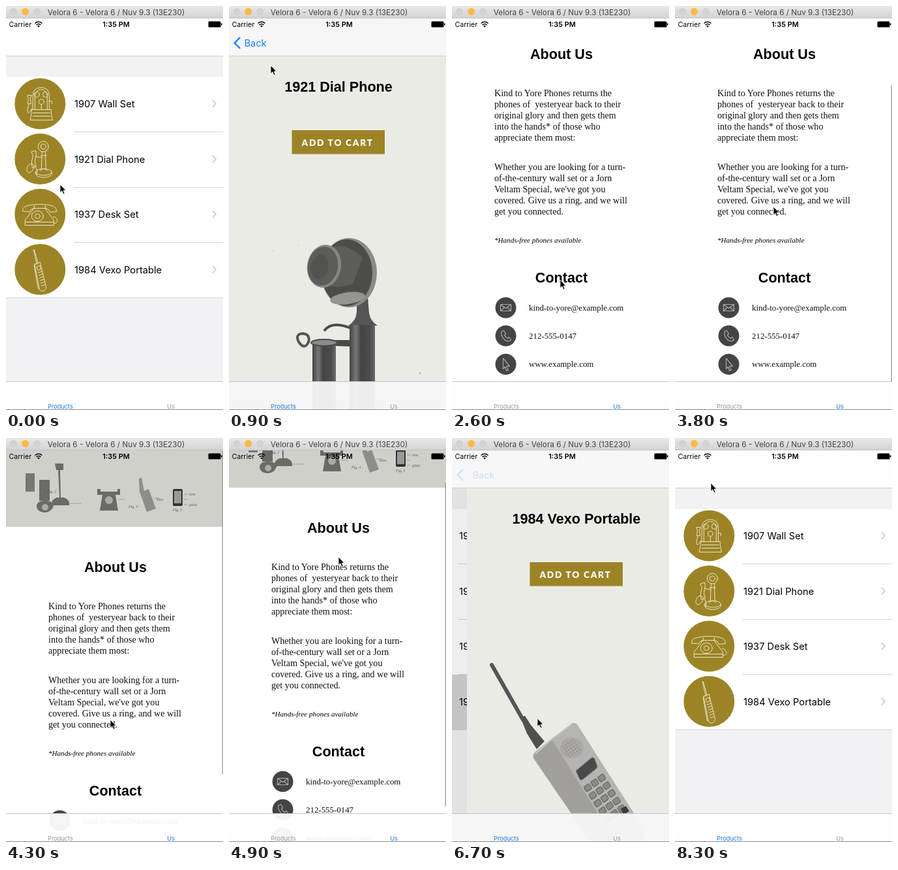
Recreate the animation shown at these times as an HTML page. Size 333x618 px, loop 8400 ms.

```html
<!DOCTYPE html>
<html lang="en">
<head>
<meta charset="utf-8">
<title>Phone shop</title>
<style>
html, body { margin: 0; width: 100%; height: 100%; overflow: hidden; background: #fff; }
svg { display: block; width: 100vw; height: 100vh; font-family: Inter, Roboto, sans-serif; }
.mid { text-anchor: middle; }
.head { font: bold 21.6px "Liberation Sans", Arial, sans-serif; text-anchor: middle; }
.body { font: 14.1px "Liberation Serif", serif; fill: #111; white-space: pre; }
.note { font: italic 11.1px "Liberation Serif", serif; }
.info { font: 12.9px "Liberation Serif", serif; fill: #111; }
.btn { font: 900 13.6px Lato, sans-serif; letter-spacing: 1.75px; fill: #fff; }
.row { font-size: 14.7px; }
.tab { font-size: 9.2px; text-anchor: middle; }
.line { fill: none; stroke: #eae3c6; stroke-width: 1; stroke-linejoin: round; stroke-linecap: round; }
.mark { fill: none; stroke: #aaa; stroke-width: 1.2; stroke-linejoin: round; }
.tiny { font: italic 6px "Liberation Serif", serif; fill: #555; }
</style>
</head>
<body>
<svg id="stage" viewBox="0 0 333 618" preserveAspectRatio="none"></svg>
<script>
const LOOP = 8400, STEP = 100, W = 333, GOLD = '#9c8426';
const clamp = (v, a = 0, b = 1) => Math.min(b, Math.max(a, v));
const rect = (x, y, w, h, fill, more = '') =>
  `<rect x="${x}" y="${y}" width="${w}" height="${h}" fill="${fill}" ${more}/>`;
const text = (x, y, cls, s, more = '') => `<text x="${x}" y="${y}" class="${cls}" ${more}>${s}</text>`;
const path = (d, more = '') => `<path d="${d}" ${more}/>`;
const lines = (x, y, gap, cls, list) => list.map((s, i) => text(x, y + i * gap, cls, s)).join('');

// Line drawings, centred on their round badges
const drawings = [
  `M-11-13Q-11-24 2-25Q14-24 14-13V9H-11ZM-8 9V-12Q-7-21 2-22Q10-21 11-12V9M-13 9H17V13L19 25H-15L-13 13ZM-11 14H15M-11 19L16 19
   M-1-14a4 4 0 1 0-8 0a4 4 0 1 0 8 0M12-14a4 4 0 1 0-8 0a4 4 0 1 0 8 0M6-3a4 4 0 1 0-8 0a4 4 0 1 0 8 0M2 1V8M14-4H18V0
   M-19-13H-13L-15-8L-14 0H-19L-18-8ZM-17 0C-23 18-16 16-13 8`,
  `M13-19a8 8 0 1 0-16 0a8 8 0 1 0 16 0M9-19a4 4 0 1 0-8 0a4 4 0 1 0 8 0M3-11L2 16M8-11L9 16M1-5H10M-7 20a12.500 5 0 1 0 25 0a12.500 5 0 1 0-25 0
   M-7 20V23C-5 30 16 30 18 23V20M0 18Q5 12 11 18M2-2L-7-4M-13-11L-7-13L-6-8L-8 4L-6 11L-12 13L-13 5L-11-5ZM-9 12C-15 29-26 18-17 9C-12 4-2 14-5 24`,
  `M-27-5C-28-13-15-15 0-15C15-15 26-13 25-4L15-3Q14-8 9-9H-10Q-15-8-16-4ZM-10-9L-13-4L-23 9V17H21V9L11-4L8-9M5 3a9 8 0 1 0-18 0a9 8 0 1 0 18 0
   M0 3a4 3.500 0 1 0-8 0a4 3.500 0 1 0 8 0M-23 12H21M-9-13V-8M8-13V-8M21 14C31 14 26 3 20 4`,
  `M-10-30L-5-8M-9-30L-3-9M-10-30H-9M-8-8L0-11L9 26Q10 31 5 33Q0 34-1 30ZM-5-4L0-6L1 0L-3 1ZM-3 5L3 3M-2 9L4 7M-1 13L5 11M0 17L6 15M1 21L7 19M2 25L8 23M-8-8L-9-5L-3 29L-1 30`
];
const names = ['1907 Wall Set', '1921 Dial Phone', '1937 Desk Set', '1984 Vexo Portable'];
const rowY = i => 108.5 + 84.5 * i;

const list = rect(0, 77, W, 497, '#f2f2f5') + rect(0, 108.5, W, 337, '#fff') +
  names.map((name, i) => {
    const y = rowY(i), c = y + 41;
    return rect(0, y, W, 84.5, '#d2d2d2', `id="row${i}" opacity="0"`) +
      `<circle cx="52.300" cy="${c}" r="39" fill="${GOLD}"/>` +
      path(drawings[i], `class="line" transform="translate(52.300 ${c})"`) +
      text(105, c + 5.5, 'row', name) +
      path(`M317 ${c - 5.5}l5 5.500l-5 5.500`, 'fill="none" stroke="#c7c7cc" stroke-width="1.600"') +
      rect(i < 3 ? 104 : 0, Math.round(y + 83.5), W, 1, '#d3d3d6');
  }).join('');

const candlestick = `
  ${path('M107 514q-6-12 6-13q12 1 9 13q-6 13-15 0', 'fill="none" stroke="#555" stroke-width="4"')}
  ${path('M163 511L190 511V521L163 520Z', 'fill="#4a4a4a"')}
  ${path('M146 497Q158 480 190 494', 'fill="none" stroke="#4a4a4a" stroke-width="4"')}
  ${rect(128, 518, 36, 100, 'url(#tube)')}
  <ellipse cx="146" cy="515" rx="20" ry="5" fill="#8a8a87" stroke="#4a4a4a" stroke-width="2"/>
  ${path('M196 446H213L215 470Q217 482 228 489H183Q195 482 196 468Z', 'fill="#555"')}
  ${rect(185, 488, 39, 130, 'url(#tube)')}
  <ellipse cx="184" cy="408" rx="43" ry="53" fill="#8a8a88"/>
  <ellipse cx="181" cy="408" rx="39" ry="51" fill="#4c4c4b"/>
  ${path('M155 370Q180 360 205 385L190 425Q168 432 154 428Z', 'fill="#5d5d5b"')}
  <ellipse cx="182" cy="447" rx="27" ry="9" fill="#959592" transform="rotate(-8 182 447)"/>
  <ellipse cx="146" cy="398" rx="26" ry="33" fill="#858582" transform="rotate(10 146 398)"/>
  <ellipse cx="144" cy="398" rx="23" ry="30" fill="#5c5c5a" transform="rotate(10 144 398)"/>
  <ellipse cx="139" cy="399" rx="13" ry="19" fill="#525251" transform="rotate(10 139 399)"/>
  ${rect(292, 561, 1.5, 1.5, '#666')}${rect(106, 366, 1, 1, '#999')}${rect(67, 374, 1, 1, '#999')}`;

let keys = '', holes = '';
for (let i = 0; i < 15; i++)
  keys += rect(i % 3 * 13, (i / 3 | 0) * 14, 10, 9, '#8a8a87', 'rx="2" stroke="#5c5c5a"');
for (let i = 0; i < 25; i++)
  holes += `<circle cx="${i % 5 * 4.5}" cy="${(i / 5 | 0) * 4.5}" r="1" fill="#858582"/>`;
const brick = `
  ${path('M38 347L86 431', 'stroke="#555" stroke-width="6" stroke-linecap="round"')}
  ${path('M82 427L89 425L98 439L119 464L107 476L92 452Z', 'fill="#505050"')}
  ${path('M102 490Q100 484 106 479L131 459L162 436L170 440L260 580L250 618H190Z', 'fill="#aaa9a6"')}
  ${path('M102 488L131 462L228 618H190Z', 'fill="#a09f9c"')}
  ${path('M131 462L160 437Q167 434 171 441L272 600V618H228Z', 'fill="#b5b4b0"')}
  ${path('M105 483L131 460L162 437', 'fill="none" stroke="#c8c7c3" stroke-width="2"')}
  <ellipse cx="161" cy="474" rx="18" ry="16" fill="#a9a8a4"/>
  <g transform="matrix(.82 -.57 .54 .84 148 472)">${holes}</g>
  ${path('M167 509L190 490Q194 487 196 491L200 502Q200 505 197 507L177 523Q173 524 172 520Z', 'fill="#4a4a4a" stroke="#888"')}
  <g transform="matrix(.82 -.57 .54 .84 179 534)">${keys}</g>
  ${path('M236 567L244 563L249 571L240 576Z', 'fill="#3c3c3c"')}`;

const detail = (id, name, photo) => `<g id="${id}">${rect(0, 77, W, 541, '#ebebe6')}
  ${text(168, 131, 'head', name)}${rect(96.5, 190, 142.5, 36.5, GOLD)}
  ${text(111.5, 213.5, 'btn', 'ADD TO CART')}${photo}</g>`;

// Banner at the top of the about page
const banner = rect(0, -124, W, 136, '#d0d0cb') + `<g fill="#6a6a67">
  ${path('M75-85h13v10h-5l1 42h5q9 3 8 12h-27q-1-9 8-12h4l-2-42h-3z')}
  ${path('M47-20q1-9 14-8q11 0 12 8q-3 9-13 10q-13-1-13-10M51-60h16v32h-16z')}
  ${path('M145-42h26v-4h4v9h-7l4 24h-28l4-24h-8v-9h5z')}
  ${path('M204-62l4-1l4 20l7-3l11 30l-14 5l-11-31z', 'fill="#8d8d8a"')}
  ${rect(256, -46, 15, 26, '#333', 'rx="2"')}${rect(258, -43, 11, 19, '#999')}
  ${path('M30-70h14v28h-14z', 'fill="#777774"')}</g>
  <circle cx="60" cy="-18" r="5" fill="#aaa"/><circle cx="158" cy="-29" r="6" fill="#aaa"/>
  ${path('M98-24h18M172-30h10M226-32h10M273-38h6M273-30h6M273-22h6', 'stroke="#888" stroke-width=".7"')}
  ${[[63, -40, 'Fig. 2'], [188, -17, 'Fig. 4'], [256, -12, 'Fig. 3'], [231, -28, 'keys'], [281, -36, 'lens'], [281, -20, 'glass']]
    .map(([x, y, s]) => text(x, y, 'tiny', s)).join('')}`;

const badge = (y, d) => `<circle cx="82.500" cy="${y}" r="16" fill="#444"/>` +
  path(d, `class="mark" transform="translate(82.500 ${y})"`);
const about = rect(0, 19, W, 599, '#fff') + `<g id="scroll">${banner}
  ${text(168, 81, 'head', 'About Us')}
  ${lines(65, 137.5, 17.2, 'body', ['Kind to Yore Phones returns the', 'phones of  yesteryear back to their',
    'original glory and then gets them', 'into the hands* of those who', 'appreciate them most:'])}
  ${lines(65, 251, 17.1, 'body', ['Whether you are looking for a turn-', 'of-the-century wall set or a Jorn',
    "Veltam Special, we've got you", 'covered. Give us a ring, and we will', 'get you connected.'])}
  ${text(65, 362, 'note', '*Hands-free phones available')}
  ${text(168, 423, 'head', 'Contact')}
  ${badge(461.5, 'M-8-5H8V5H-8ZM-8-5L0 1L8-5M-8 5L-2-.5M8 5L2-.5')}
  ${badge(504.5, 'M-6-7L-3-8L0-3L-2-1Q0 3 3 4L5 2L8 6L6 8Q-1 9-5 2Q-8-3-6-7Z')}
  ${badge(548, 'M-4-9L6 3L1 3L4 9L1 10L-1 4L-4 7Z')}
  ${lines(118, 465.5, 43.3, 'info', ['kind-to-yore@example.com', '212-555-0147', 'www.example.com'])}</g>`;

const statusBar = text(4.5, 32, '', 'Carrier', 'font-size="10.600"') +
  `<g fill="none" stroke="#000" stroke-width="1.500">${path('M44.500 26.500q5.500-4.500 11 0M46.500 29q3.500-3 7 0')}</g>` +
  path('M48 30.500q2-1.500 4 0l-2 2z') +
  text(169, 32, 'mid', '1:35 PM', 'font-size="10.900" font-weight="600"') +
  rect(310.5, 23.5, 19, 9, '#000', 'rx="1.500"') + rect(330, 26.5, 1.5, 3, '#000');

const titleBar = rect(0, 0, W, 19, 'url(#chrome)') + rect(0, 18.5, W, 0.5, '#b5b5b5') +
  [[11.5, '#d2d2d2'], [29.5, '#fdbc40'], [47.5, '#d2d2d2']]
    .map(([x, c]) => `<circle cx="${x}" cy="8.500" r="5.500" fill="${c}"/>`).join('') +
  text(169, 13.5, 'mid', 'Velora 6 - Velora 6 / Nuv 9.3 (13E230)', 'font-size="11.750" fill="#444"');

document.getElementById('stage').innerHTML = `<defs>
  <linearGradient id="chrome" x2="0" y2="1"><stop stop-color="#e8e8e8"/><stop offset="1" stop-color="#d2d2d2"/></linearGradient>
  <linearGradient id="tube"><stop stop-color="#444"/><stop offset=".25" stop-color="#777"/><stop offset=".45" stop-color="#444"/>
  <stop offset=".8" stop-color="#4c4c4c"/><stop offset="1" stop-color="#6a6a6a"/></linearGradient></defs>
  ${rect(0, 0, W, 618, '#fff')}<g id="list">${list}</g>${rect(0, 77, W, 497, '#000', 'id="dim"')}
  ${detail('dial', names[1], candlestick)}${detail('portable', names[3], brick)}
  <g id="nav">${rect(0, 19, W, 58, '#fff', 'id="navFill"')}${rect(0, 76, W, 1, '#cfcfd1')}
  <g id="back">${path('M17 48L8.500 56.500L17 65', 'fill="none" stroke="#157efb" stroke-width="2.400"')}
  ${text(23.5, 62, '', 'Back', 'id="backText" font-size="14.500" fill="#157efb"')}</g></g>
  <g id="about">${about}</g>
  ${rect(0, 574, W, 44, '#fff', 'id="tabFill" fill-opacity=".95"')}${rect(0, 574, W, 1, '#c4c4c6')}
  ${text(83.5, 616, 'tab', 'Products', 'id="products"')}${text(253, 616, 'tab', 'Us', 'id="us"')}
  ${rect(331.7, 0, 1.3, 0, '#9a9a9a', 'id="thumb"')}
  ${statusBar}${titleBar}${rect(0, 617, W, 1, '#8a8a8a')}
  ${path('M0 0V12.500L2.900 9.800L5 14.700L7 13.800L5 9.100H8.800Z', 'id="cursor" stroke="#fff" stroke-width=".8"')}`;

const el = id => document.getElementById(id);
const set = (id, attrs) => { for (const k in attrs) el(id).setAttribute(k, attrs[k]); };
const show = (id, on) => set(id, { display: on ? 'inline' : 'none' });

// [time, x, y]
const pointer = [[0, 83, 273], [100, 83, 273], [300, 80, 250], [450, 79, 240], [900, 64, 91], [1100, 48, 62], [1250, 48, 62],
  [1800, 167, 494], [2100, 243, 605], [2250, 243, 605], [2600, 166, 419], [2700, 166, 419], [3100, 160, 350], [3200, 160, 350],
  [3800, 151, 307], [4200, 160, 431], [4300, 160, 431], [4700, 169, 242], [4800, 169, 242], [4900, 168, 182], [5000, 167, 118],
  [5400, 84, 605], [5600, 84, 605], [6150, 128, 400], [6300, 128, 400], [6700, 131, 429], [6800, 131, 429], [7650, 45, 60],
  [7850, 45, 60], [8300, 55, 69]];
// [time, offset]
const scrolling = [[2700, 0], [3100, -44], [3200, -44], [3500, 0], [3800, 0], [4200, 124], [4800, 124], [4900, 64], [5000, 0]];
// Visits to a product: tapped row, tap, push start, pop start
const visits = [{ row: 1, tap: 150, push: 250, pop: 1150 }, { row: 3, tap: 6300, push: 6405, pop: 7780 }];

function track(keys, t) {
  const i = keys.findIndex(k => k[0] > t);
  if (i < 0) return keys[keys.length - 1].slice(1);
  if (i === 0) return keys[0].slice(1);
  const a = keys[i - 1], b = keys[i], f = (t - a[0]) / (b[0] - a[0]);
  return a.slice(1).map((v, j) => v + (b[j + 1] - v) * f);
}
const easeOut = f => 1 - (1 - f) ** 3;

function draw(t) {
  const v = visits[t < 3000 ? 0 : 1];
  const popping = t >= v.pop;
  const f = clamp((t - (popping ? v.pop : v.push)) / 500);
  const p = popping ? 1 - easeOut(f) : easeOut(f);
  const inAbout = t >= 2250 && t < 5500;

  set('list', { transform: `translate(${-101 * p} 0)` });
  set('dim', { opacity: 0.07 * p });
  [['dial', 1], ['portable', 3]].forEach(([id, row]) => {
    show(id, row === v.row && p > 0);
    set(id, { transform: `translate(${W * (1 - p)} 0)` });
    set('row' + row, { opacity: row !== v.row || t < v.tap ? 0 : popping ? p : 1 });
  });
  const c = 254 - 8 * p, fill = `rgb(${c},${c},${c})`;
  set('navFill', { fill });
  set('tabFill', { fill });
  set('back', { opacity: clamp(((popping ? 1 - f : f) - 0.5) / 0.5) });
  set('backText', { x: 23.5 + 116 * (1 - p) });

  show('nav', !inAbout);
  show('about', inAbout);
  set('products', { fill: inAbout ? '#999' : '#157efb' });
  set('us', { fill: inAbout ? '#157efb' : '#999' });

  const [offset] = track(scrolling, t), top = 121 - 0.82 * offset;
  set('scroll', { transform: `translate(0 ${offset})` });
  set('thumb', { y: top, height: Math.min(495, 575 - top), opacity: t < 2750 ? 0 : clamp((5400 - t) / 300) });

  const [x, y] = track(pointer, t);
  set('cursor', { transform: `translate(${x} ${y})` });
}

function tick() {
  draw(Math.floor(performance.now() % LOOP / STEP) * STEP);
  requestAnimationFrame(tick);
}
tick();
</script>
</body>
</html>
```
